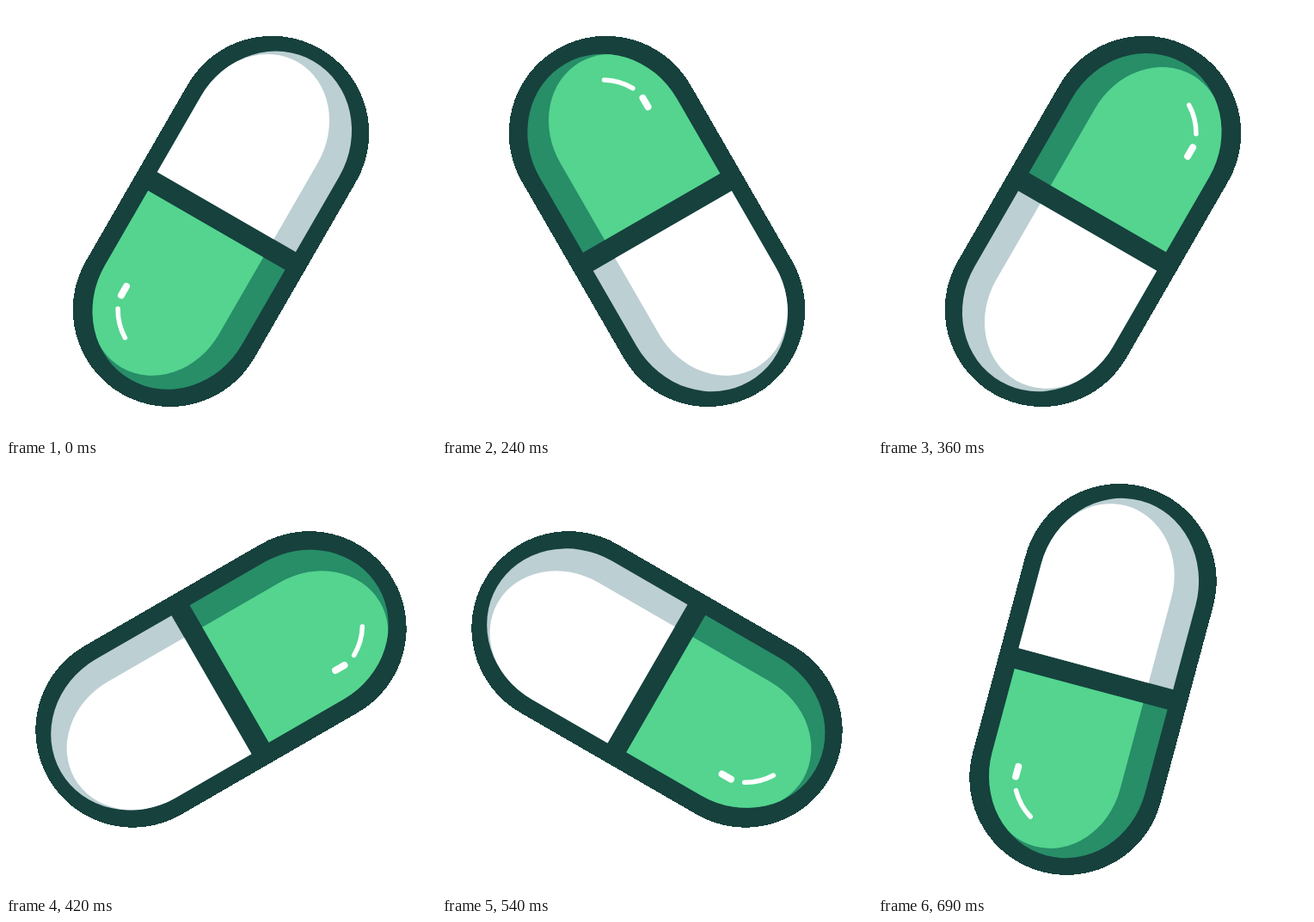
These frames come from a looping animation (500x500 px, 0.72 s). An HTML page:

```html
<!DOCTYPE html>
<html lang="en">
<head>
<meta charset="utf-8">
<title>Spinning capsule</title>
<style>
  html, body { margin: 0; height: 100%; overflow: hidden; background: #fff; }
  svg { display: block; width: 100vw; height: 100vh; }
</style>
</head>
<body>
<svg viewBox="-250 -250.4 500 500">
  <defs>
    <path id="white" d="M12.7-93H114A101 93 0 0 1 114 93H12.7Z"/>
    <path id="green" d="M-11.5-91.3H-112A100 92 0 0 0-112 92.7H-11.5Z"/>
    <clipPath id="whiteClip"><use href="#white"/></clipPath>
    <clipPath id="greenClip"><use href="#green"/></clipPath>
    <path id="lit" d="M0-93.5H115A90 78.5 0 0 1 115 63.5H0Z"/>
  </defs>
  <g id="capsule">
    <rect x="-231.5" y="-113" width="463" height="226" rx="113" fill="#17413d" shape-rendering="crispEdges"/>
    <use href="#white" fill="#bccfd3"/>
    <g clip-path="url(#whiteClip)"><use href="#lit" fill="#fff"/></g>
    <use href="#green" fill="#278e68"/>
    <g clip-path="url(#greenClip)"><use href="#lit" fill="#54d48f" transform="scale(-1 1)"/></g>
    <g fill="none" stroke="#fff" stroke-linecap="round">
      <path d="M-132.5-57.5h12" stroke-width="8"/>
      <path d="M-173-29Q-164-44-148-53" stroke-width="5.5"/>
    </g>
  </g>
</svg>
<script>
  const STEP_MS = 30, STEPS = 24, START_ANGLE = -60;
  const capsule = document.getElementById('capsule');
  const start = performance.now();

  function draw(now) {
    const step = Math.floor(Math.max(0, now - start) / STEP_MS) % STEPS;
    capsule.setAttribute('transform', `rotate(${START_ANGLE + step * 360 / STEPS})`);
    requestAnimationFrame(draw);
  }
  draw(start);
</script>
</body>
</html>
```
